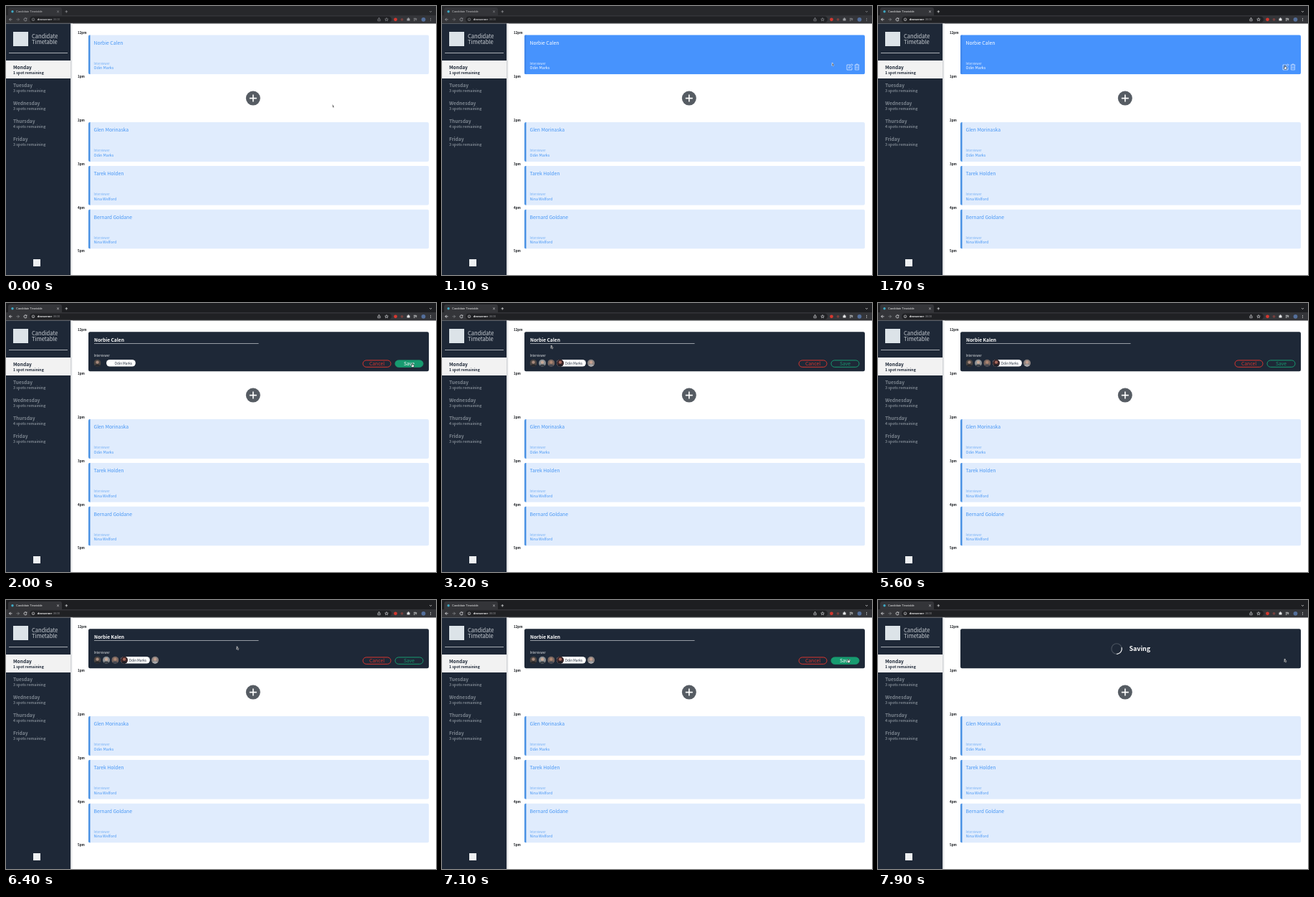
Recreate the animation shown at these times as an HTML page with a canvas. Size 600 by 375 pixels, loop 8000 ms.

```html
<!DOCTYPE html>
<html lang="en">
<head>
<meta charset="utf-8">
<title>Candidate Timetable</title>
<style>
  html, body { margin: 0; width: 100%; height: 100%; overflow: hidden; background: #fff; }
  canvas { display: block; }
</style>
</head>
<body>
<canvas id="stage" width="600" height="375"></canvas>
<script>
const c = document.getElementById('stage').getContext('2d');
const LOOP = 8000, STEP = 100;
const SANS = '"Noto Sans CJK JP", "Noto Sans CJK SC", "Noto Sans", sans-serif';
const UI = '"Liberation Sans", Arial, sans-serif';
const NAVY = '#1e2837', BLUE = '#4696f5', RED = '#d8352f', GREEN = '#179b70';

const FOCUS = 1700, FORM = 1800, FACES = 2100, ERASE = 4300, RETYPE = 4700, SAVING = 7400;

// Pointer path: time, x, y
const PATH = [
  [0, 455, 137], [1099, 455, 137], [1100, 544, 79], [1300, 568, 84], [1900, 568, 85],
  [2000, 567, 86], [2300, 567, 86], [3000, 160, 62], [3200, 152, 59], [3500, 146.5, 51],
  [6000, 146.5, 51], [6900, 567, 84], [7100, 567, 84], [7900, 567, 82], [LOOP, 567, 82]
];

function pointerAt(t) {
  const i = PATH.findIndex(p => p[0] > t);
  const [t0, x0, y0] = PATH[i - 1], [t1, x1, y1] = PATH[i];
  const k = (t - t0) / (t1 - t0), e = k * k * (3 - 2 * k);
  return { x: x0 + (x1 - x0) * e, y: y0 + (y1 - y0) * e };
}

function text(s, x, y, size, color, weight = 400, align = 'left', family = SANS) {
  c.font = `${weight} ${size}px ${family}`;
  c.textAlign = align;
  c.fillStyle = color;
  c.fillText(s, x, y);
}

function rect(x, y, w, h, color) {
  c.fillStyle = color;
  c.fillRect(x, y, w, h);
}

function pill(x, y, w, h, r, fill, stroke) {
  c.beginPath();
  c.roundRect(x, y, w, h, r);
  if (fill) { c.fillStyle = fill; c.fill(); }
  if (stroke) { c.strokeStyle = stroke; c.lineWidth = 1; c.stroke(); }
}

function disc(x, y, r, color) {
  c.beginPath();
  c.arc(x, y, r, 0, 7);
  c.fillStyle = color;
  c.fill();
}

function path(d, x, y, stroke, width = 0.8, fill) {
  const p = new Path2D(d);
  c.save();
  c.translate(x, y);
  if (fill) { c.fillStyle = fill; c.fill(p); }
  if (stroke) { c.strokeStyle = stroke; c.lineWidth = width; c.stroke(p); }
  c.restore();
}

function browser(active) {
  const icon = active ? '#e4e5e7' : '#9b9da1', dim = active ? '#85878b' : '#707276';
  rect(0, 0, 600, 14, active ? '#1d1e21' : '#27282b');
  pill(3, 2, 75, 14, 3, '#343539');
  rect(0, 13, 600, 11.5, '#343539');
  pill(33, 14.6, 505, 8.4, 4.2, '#202124');
  disc(9, 7.7, 1.7, '#3fa9c4');
  text('Candidate Timetable', 14, 9.2, 4, active ? '#eceded' : '#c4c5c7', 400, 'left', UI);
  path('M-1.3-1.3L1.3 1.3M1.3-1.3L-1.3 1.3', 72.5, 7.8, icon, 0.6);
  path('M-1.8 0H1.8M0-1.8V1.8', 84.3, 7.8, icon, 0.7);
  path('M-1.5-.8L0 .8L1.5-.8', 592.5, 7.8, icon, 0.7);
  path('M2 0H-2M0-2L-2 0L0 2', 6.5, 18.8, icon);
  path('M-2 0H2M0-2L2 0L0 2', 16.5, 18.8, dim);
  path('M1.6-1.2A2 2 0 1 0 2 .3M1.9-2.2V-.8H.5', 27, 18.8, icon);
  path('M-1.8 0A1.8 1.8 0 1 0 1.8 0A1.8 1.8 0 1 0-1.8 0M0-.2V1', 38, 18.8, icon, 0.6);
  text('devserver', 43.8, 20.4, 4.3, active ? '#fff' : '#d9dadc', 700, 'left', UI);
  text(':3600', 64.5, 20.4, 4.3, dim, 400, 'left', UI);
  path('M-1-.5H-1.7V2.2H1.7V-.5H1M0 1V-2.2M-1-1.3L0-2.3L1-1.3', 520.5, 18.6, icon, 0.6);
  path('M0-2.3L.7-.7L2.3-.6L1 .4L1.5 2L0 1.1L-1.5 2L-1 .4L-2.3-.6L-.7-.7Z', 531, 18.8, icon, 0.6);
  disc(543.5, 18.8, 2.4, '#d5382f');
  disc(552.5, 18.8, 1.9, '#75403e');
  path('M-2-1H-.7A.9.9 0 1 1 .8-1H2V2H-2Z', 561.5, 18.6, null, 0, icon);
  path('M-2.2-1.5H1M-2.2 0H1M-2.2 1.5H-.3M1.7-1.8V1.4', 571, 18.8, icon, 0.7);
  disc(582.5, 18.8, 2.9, '#546f9b');
  for (const dy of [-1.6, 0, 1.6]) disc(592.5, 18.8 + dy, 0.5, icon);
}

function sidebar() {
  rect(0, 24.5, 90, 351, NAVY);
  const shade = c.createLinearGradient(90, 0, 93, 0);
  shade.addColorStop(0, '#c9ccd0');
  shade.addColorStop(1, '#fff');
  rect(90, 24.5, 3, 351, shade);
  rect(10, 36, 21, 20, '#dce3e8');
  text('Candidate', 36, 44.6, 7.6, '#c9ced4', 300);
  text('Timetable', 36, 53.2, 7.6, '#c9ced4', 300);
  rect(4, 65, 82, 1, '#a8adb4');
  rect(0, 76, 90, 25, '#f2f2f2');
  ['Monday', 'Tuesday', 'Wednesday', 'Thursday', 'Friday'].forEach((day, i) => {
    const spots = [1, 3, 3, 4, 3][i], y = 87.6 + 25 * i, color = i ? '#7c858f' : NAVY;
    text(day, 10, y, 6.6, color, 700);
    text(`${spots} spot${spots > 1 ? 's' : ''} remaining`, 10, y + 7.2, 5.2, color, 700);
  });
  rect(38, 353, 10, 10, '#eef0f2');
}

function booking(y, name, host, hover) {
  c.save();
  c.beginPath();
  c.roundRect(115, y, 475, 55, 2.2);
  c.clip();
  rect(115, y, 475, 55, hover ? '#4793fd' : '#e0ecfd');
  rect(115, y, 2.5, 55, hover ? '#4389ec' : '#4a92e4');
  c.restore();
  const color = hover ? '#fff' : BLUE;
  text(name, 122.5, y + 13.2, 6.75, color);
  text('Interviewer', 122.5, y + 41.2, 4.15, hover ? '#e5efff' : '#72aef5', 300);
  text(host, 122.5, y + 47.7, 5.25, color);
  if (!hover) return;
  path('M1-3H-4V4H3V.5M-1.5 1.5L-1-.5L3-4.2L4.3-2.9L.4 1Z', 569, 85, '#d9e8ff', 0.8);
  path('M-3.3-2.8H3.3M-1.2-2.8V-4H1.2V-2.8M-2.6-2.8V4H2.6V-2.8M-1-1V2.5M1-1V2.5', 579, 85, '#d9e8ff', 0.7);
}

function avatar(x, back, skin, coat) {
  c.save();
  c.beginPath();
  c.arc(x, 83.7, 5, 0, 7);
  c.clip();
  rect(x - 5, 78, 10, 12, back);
  c.beginPath();
  c.ellipse(x, 89, 4, 3.4, 0, 0, 7);
  c.fillStyle = coat;
  c.fill();
  disc(x, 82.6, 2.2, skin);
  c.restore();
}

function button(x, label, color, filled) {
  pill(x + 0.5, 79.9, 39, 9.4, 4.7, filled ? color : null, color);
  text(label, x + 20, 87.1, 6.75, filled ? '#fff' : color, 400, 'center');
}

function form(name, loaded, saveHover) {
  pill(115, 40.3, 475, 55, 2.2, NAVY);
  text(name, 123, 53.9, 6.6, '#fff', 700);
  rect(123, 56, 229.5, 0.8, '#b4b9c0');
  text('Interviewer', 122.7, 74.8, 4.15, '#e6e8eb');
  avatar(127.5, '#4c4643', '#a88a7c', '#27282c');
  const x = loaded ? 160 : 140;
  if (loaded) {
    avatar(140, '#8d9194', '#c9aa98', '#3c4147');
    avatar(152.3, '#79665f', '#ad8672', '#454852');
    avatar(208, '#8e8582', '#c5a090', '#a6a7aa');
  }
  pill(x, 78.9, 40.8, 9.7, 4.8, '#fff');
  if (loaded) avatar(165, '#3a2528', '#a5685c', '#1d1e25');
  text('Odin Marks', x + 11.6, 85.5, 4.65, NAVY);
  button(497.5, 'Cancel', RED, false);
  button(542.5, 'Save', GREEN, saveHover);
}

function saving(t) {
  pill(115, 40.3, 475, 55, 2.2, NAVY);
  const turn = (t - 7900) / 1000 * Math.PI * 2;
  const arc = (from, to, color) => {
    c.beginPath();
    c.arc(333, 68, 7.2, from, to);
    c.strokeStyle = color;
    c.lineWidth = 1.1;
    c.stroke();
  };
  arc(0, 7, '#4a535f');
  arc(turn - 0.25, turn + 1.6, '#fff');
  text('Saving', 350.5, 71.3, 8.9, '#fff', 700);
}

function pointer({ x, y }, kind) {
  if (kind === 'hand')
    path('M-.6-1.8Q0-2.6.5-1.8V0L2.3.5V2.2L1.6 3.6H-.6L-2 1.4L-1.5.8L-.6 1.4Z', x, y, '#111', 0.5, '#fff');
  else if (kind === 'beam')
    path('M-1-2.5Q0-2.5 0-2Q0-2.5 1-2.5M0-2V2M-1 2.5Q0 2.5 0 2Q0 2.5 1 2.5', x, y, '#fff', 0.6);
  else
    path('M0 0V4.4L1-.1L1 3.5L1.8 5.1L2.5 4.8L1.8 3.2H3.2Z', x, y, '#fff', 0.4, '#111');
}

function draw(t) {
  const p = pointerAt(t), editing = t >= FORM && t < SAVING;
  const over = (x0, y0, x1, y1) => p.x >= x0 && p.x <= x1 && p.y >= y0 && p.y <= y1;
  const onSave = editing && over(542, 79, 583, 90);
  rect(0, 0, 600, 375, '#fff');
  browser(t >= FOCUS);
  sidebar();

  ['12pm', '1pm', '2pm', '3pm', '4pm', '5pm'].forEach((hour, i) =>
    text(hour, 100, 39.4 + 60.8 * i, 4.5, '#15181c', 700));
  disc(344.8, 128.6, 10, '#565c63');
  path('M-5 0H5M0-5V5', 344.8, 128.6, '#fff', 1.6);
  booking(162, 'Glen Morinaska', 'Odin Marks');
  booking(222.8, 'Tarek Holden', 'Nina Welford');
  booking(283.5, 'Bernard Goldane', 'Nina Welford');

  const initial = t < ERASE ? 'C' : t < RETYPE ? '' : 'K';
  if (t < FORM) booking(40.3, 'Norbie Calen', 'Odin Marks', over(115, 40, 590, 96));
  else if (editing) form(`Norbie ${initial}alen`, t >= FACES, onSave);
  else saving(t);

  const onIcon = t < FORM && over(564, 80, 583, 90);
  const onField = editing && over(123, 45, 352, 57);
  const typing = t >= ERASE && t < 6000;
  if (!typing) pointer(p, onSave || onIcon ? 'hand' : onField ? 'beam' : 'arrow');
}

const start = performance.now();
function tick() {
  const t = (performance.now() - start) % LOOP;
  draw(Math.floor(t / STEP) * STEP);
  requestAnimationFrame(tick);
}
tick();
</script>
</body>
</html>
```
